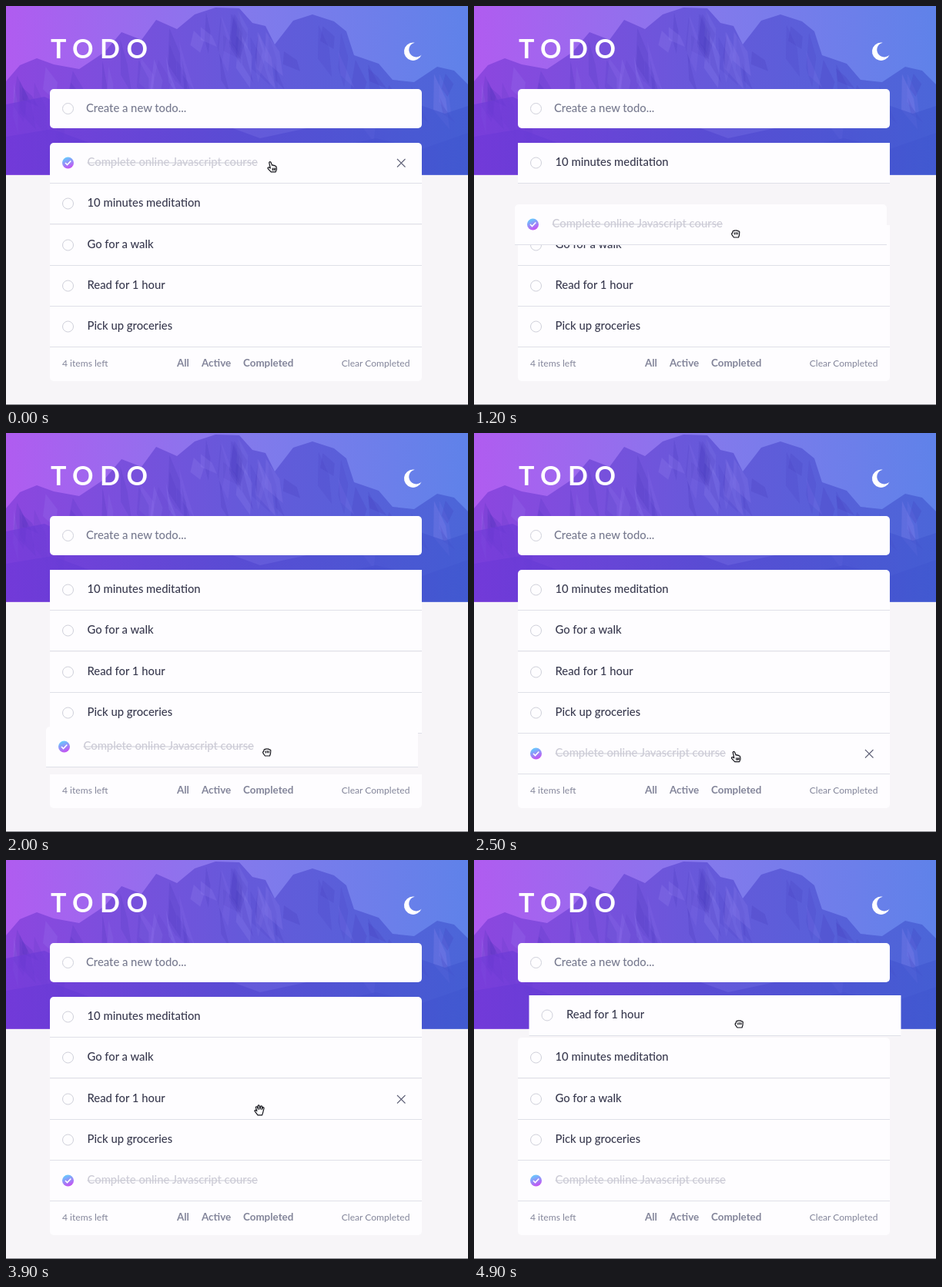
Animation of 600 by 519 pixels, one loop 5000 ms. Source, as an HTML page:

```html
<!DOCTYPE html>
<html lang="en">
<head>
<meta charset="utf-8">
<title>Todo</title>
<style>
  html, body { margin: 0; width: 100%; height: 100%; overflow: hidden; background: #f7f5f8; }
  svg { display: block; width: 100%; height: 100%; }
  text { font: 500 14.8px Lato, "Open Sans", sans-serif; fill: #393a4f; white-space: pre; }
  .title { font-size: 34px; font-weight: 700; letter-spacing: 8.5px; fill: #fff; }
  .hint { fill: #777a8f; }
  .small { font-size: 12.1px; font-weight: 400; fill: #83859a; }
  .tab { font-size: 13.4px; font-weight: 700; fill: #83859a; }
  .done { fill: #cccbd6; }
  .card { fill: #fefdff; }
  .ring { fill: #fefdff; stroke: #cfd0da; }
  .line { stroke: #dfe0e8; }
  .cross { fill: none; stroke: #5c5e75; stroke-width: 1.1; }
  .cursor path { fill: #fff; stroke: #15151c; stroke-width: 1.2; stroke-linejoin: round; stroke-linecap: round; }
</style>
</head>
<body>
<svg viewBox="0 0 600 519">
  <defs>
    <linearGradient id="sky">
      <stop offset="0" stop-color="#b05cf0"/><stop offset=".5" stop-color="#8479ec"/><stop offset="1" stop-color="#5f82e9"/>
    </linearGradient>
    <linearGradient id="rock">
      <stop offset="0" stop-color="#8d46df"/><stop offset=".5" stop-color="#6659da"/><stop offset="1" stop-color="#4b66d8"/>
    </linearGradient>
    <linearGradient id="hill">
      <stop offset="0" stop-color="#6f38d8"/><stop offset=".5" stop-color="#5245d0"/><stop offset="1" stop-color="#4058d0"/>
    </linearGradient>
    <linearGradient id="tick" x1="0" y1="0" x2=".4" y2="1">
      <stop offset="0" stop-color="#57ddff"/><stop offset="1" stop-color="#c058f3"/>
    </linearGradient>
    <clipPath id="top"><path d="M0 0H600V219.5H0Z"/></clipPath>
  </defs>

  <g clip-path="url(#top)">
    <path d="M0 0H600V220H0Z" fill="url(#sky)"/>
    <path id="ridge" fill="url(#rock)"/>
    <g id="facets"></g>
    <path d="M0 128L50 118 95 140 150 132 205 158 270 150 330 172 395 158 450 140 490 150 535 128 570 140 600 130V220H0Z" fill="url(#hill)" opacity=".65"/>
    <path d="M0 170L60 160 130 186 220 180 300 198 400 190 480 172 540 186 600 165V220H0Z" fill="url(#hill)" opacity=".7"/>
  </g>

  <text class="title" x="58" y="68">TODO</text>
  <path fill="#fff" transform="translate(517 47.5) scale(.9)" d="M13 0q1.2 0 2.4.2A10.5 10.5 0 1 0 25.1 17.7A13 13 0 1 1 13 0Z"/>

  <rect class="card" x="57" y="108" width="483" height="51" rx="5"/>
  <circle class="ring" cx="80.5" cy="133.5" r="7"/>
  <text class="hint" x="104" y="138">Create a new todo...</text>

  <path class="card" d="M57 444H540V483a5 5 0 0 1-5 5H62a5 5 0 0 1-5-5Z"/>
  <text class="small" x="73" y="469">4 items left</text>
  <text class="tab" x="222" y="469">All</text>
  <text class="tab" x="254" y="469">Active</text>
  <text class="tab" x="308" y="469">Completed</text>
  <text class="small" x="524.5" y="469" text-anchor="end">Clear Completed</text>

  <g id="rows"></g>

  <path d="M0 518.5H600" stroke="#85858a"/>

  <g id="cursor" class="cursor">
    <g><path d="M-3.8-5.3Q-3-7.2-1.5-5.8L.1-1.7Q1.3-2.6 2.1-1.4 3.4-2 4-.8 5.5-.9 5.7.6L6 3.4 4.7 6.9H-1.3L-5.3 2.6Q-6 .8-4.3.8L-2.2 2Z"/><path d="M.6 2.2L1 4.6M2.4 2L2.7 4.4M4.1 1.9V4.2"/></g>
    <g><path d="M-2 6.5L-6 1.4Q-6.3-.2-4.8-.1L-3.2 1.2-4.6-3.4Q-4.2-5.2-2.7-4.2L-1.3-1-1.9-5.5Q-.9-7.2.2-5.6L.9-1.2 1.8-5.1Q3.1-6.2 3.7-4.6L3.2-.8 4.6-3.5Q6.2-4.1 6-2.3L4.7 3 3.6 6.5Z"/></g>
    <g><path d="M-2.6 5L-5 1.7Q-6-.4-4.2-.9L-4-2.7Q-3.2-4.2-2-3.4-1-4.9.2-3.8 1.5-4.6 2.4-3.4 4.1-3.8 4.8-2.2L4.5 2 3.5 5Z"/><path d="M-1.7-1.2V.9M.4-1.4V.8M2.4-1.2V.8"/></g>
  </g>
</svg>
<script>
const LOOP = 5000, STEP = 100, TOP = 178, PITCH = 53.25;
const $ = id => document.getElementById(id);

// Mountain outline and its rock faces
const peaks = [0,98, 18,77, 40,68, 62,76, 95,82, 128,60, 150,34, 176,44, 195,18, 222,30, 245,11, 272,2,
  303,3, 320,22, 337,26, 349,50, 373,19, 398,11, 426,20, 442,33, 452,64, 484,75, 502,96, 530,99, 560,79, 582,84, 600,102];
$('ridge').setAttribute('d', `M0 220L${peaks.join(' ')} 600 220Z`);

let seed = 11;
const rnd = () => (seed = seed * 16807 % 2147483647) / 2147483647;
function ridgeAt(x) {
  let i = 0;
  while (peaks[i + 2] < x) i += 2;
  const [x0, y0, x1, y1] = peaks.slice(i, i + 4);
  return y0 + (y1 - y0) * (x - x0) / (x1 - x0);
}
let faces = '';
for (let i = 0; i < 60; i++) {
  const x = 10 + rnd() * 575, y = ridgeAt(x) + 3 + rnd() * rnd() * 70;
  const w = 5 + rnd() * 13, h = 25 + rnd() * 50, lean = rnd() * 24 - 8;
  faces += `<path d="M${x} ${y}l${w} ${h * .45} ${lean - w * .3} ${h * .55} ${-w - lean * .6} ${-h * .35}Z"
    fill="${i % 3 ? '#3c2cae' : '#a494f6'}" opacity="${.08 + rnd() * .1}"/>`;
}
$('facets').innerHTML = faces;

// Tracks are [time, value, ...] steps, joined by straight lines
function at(track, t) {
  let i = 0;
  while (i < track.length - 1 && track[i + 1][0] <= t) i++;
  const a = track[i], b = track[i + 1];
  if (!b || t <= a[0]) return a.slice(1);
  const k = (t - a[0]) / (b[0] - a[0]);
  return a.slice(1).map((v, j) => v + (b[j + 1] - v) * k);
}

// slots: place in the list; drag: offset from that place
const items = [
  { text: '10 minutes meditation', slots: [[0, 1], [750, 1], [950, 0], [4420, 0], [4620, 1]] },
  { text: 'Go for a walk', slots: [[0, 2], [1200, 2], [1400, 1], [4220, 1], [4420, 2]] },
  { text: 'Pick up groceries', slots: [[0, 4], [1800, 4], [2000, 3]] },
  { text: 'Read for 1 hour', slots: [[0, 3], [1540, 3], [1740, 2]],
    drag: [[4100, 0, 0], [4500, 14, -95], [4700, 14, -106], [4900, 14.5, -109]] },
  { text: 'Complete online Javascript course', done: true, slots: [[0, 0]],
    drag: [[400, 0, 0], [600, -1, 10], [1200, -4, 80], [2000, -5, 204], [2200, -5, 211], [2400, 0, 213]] },
];
const pointer = [[0, 345.5, 209], [400, 344, 212], [600, 343, 223], [1200, 340, 296], [2000, 339, 415],
  [2300, 340, 421], [3100, 340, 420], [3300, 340, 420], [3800, 329, 326], [4100, 329, 324],
  [4500, 344, 223], [4700, 344, 216], [4900, 344.5, 213]];
const hands = [[0, 0], [300, 1], [500, 2], [2400, 0], [3700, 1], [4200, 2]];

const square = 'M0 0H483V53H0Z', rounded = 'M0 53V5a5 5 0 0 1 5-5H478a5 5 0 0 1 5 5V53Z';
$('rows').innerHTML = items.map(({ text, done }) => `<g>
  <path class="card"/><path class="line" d="M0 52.5H483"/>
  ${done
    ? `<circle cx="23.5" cy="26" r="7.5" fill="url(#tick)"/>
       <path d="M20 26l2.5 2.5 4.8-5" fill="none" stroke="#fff" stroke-width="1.6"/>`
    : '<circle class="ring" cx="23.5" cy="26" r="7"/>'}
  <text x="48.5" y="30"${done ? ' class="done"' : ''}>${text}</text>
  ${done ? '<path class="strike" stroke="#cccbd6" stroke-width="1.2"/>' : ''}
  <path class="cross" d="M451 21l10.5 10.5m0-10.5L451 31.5"/></g>`).join('');

items.forEach((item, i) => {
  const g = item.el = $('rows').children[i];
  item.card = g.querySelector('.card');
  item.cross = g.querySelector('.cross');
  if (item.done) {
    const w = g.querySelector('text').getComputedTextLength();
    g.querySelector('.strike').setAttribute('d', `M48.5 26H${48.5 + w}`);
  }
});

function draw(t) {
  const [cx, cy] = at(pointer, t);
  const hand = hands.filter(h => h[0] <= t).pop()[1];
  const first = t < 2400 ? items[4] : items[0];
  $('cursor').setAttribute('transform', `translate(${cx} ${cy})`);
  [...$('cursor').children].forEach((g, i) => g.style.display = i === hand ? '' : 'none');
  for (const item of items) {
    const [dx, dy] = item.drag ? at(item.drag, t) : [0, 0];
    const y = Math.round(TOP + at(item.slots, t)[0] * PITCH + dy);
    const hover = hand < 2 && cy >= y && cy < y + 53;
    item.el.setAttribute('transform', `translate(${57 + dx} ${y})`);
    item.card.setAttribute('d', item === first ? rounded : square);
    item.cross.style.display = hover ? '' : 'none';
  }
}

const start = performance.now();
function tick() {
  const t = (performance.now() - start) % LOOP;
  draw(Math.floor(t / STEP) * STEP);
  requestAnimationFrame(tick);
}
tick();
</script>
</body>
</html>
```
